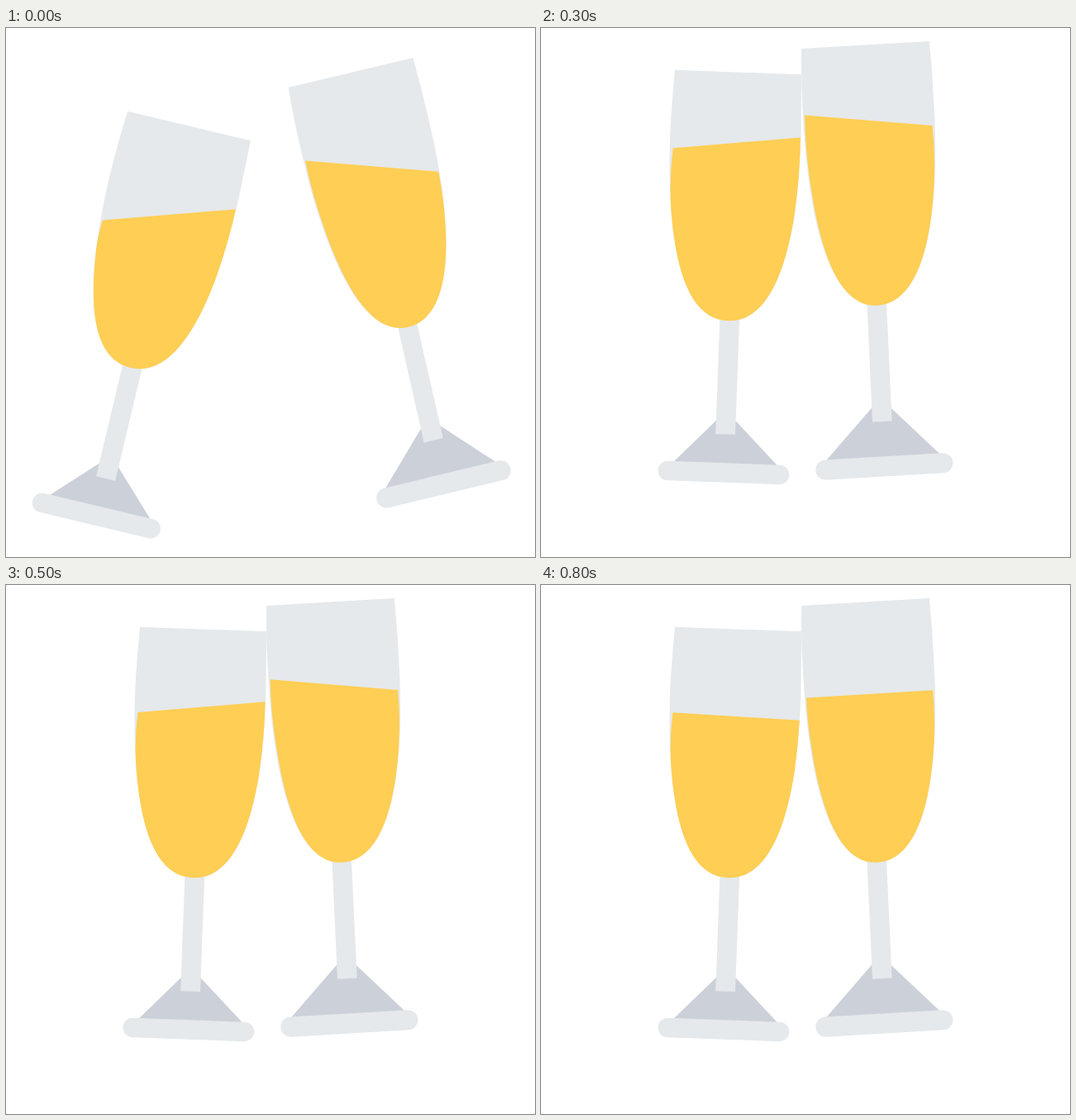
An HTML page for the animation above (1.4 s loop, 640 by 640 pixels).

```html
<!DOCTYPE html>
<html lang="en">
<head>
<meta charset="utf-8">
<title>Cheers</title>
<style>
  html, body { margin: 0; width: 100%; height: 100%; overflow: hidden; background: #fff; }
  svg { display: block; width: 100%; height: 100%; }
  .glass { fill: #e5e9ec; }
  .foot { fill: #ccd1d9; }
  .wine { fill: #ffce54; }
</style>
</head>
<body>
<svg viewBox="0 0 640 640">
  <!-- each glass is drawn upright, with the middle of its rim at 0,0 -->
  <g id="left">
    <path class="foot" d="M-62 475L-11 422H13L66 475Z"/>
    <path class="glass" d="M-11.2 290H12.6V438.4H-11.2Z"/>
    <rect class="glass" x="-79.3" y="473" width="159" height="23.5" rx="11.75"/>
    <path class="glass" d="M-76.5 0H76.5Q78 40 78.7 75C79 216 54 301 -1 301C-55 301 -79.5 218 -79.5 75Q-79 40 -76.5 0Z"/>
    <path class="wine"/>
  </g>
  <g id="right">
    <path class="foot" d="M-77.7 500L-18.2 439L6 441L61.7 500Z"/>
    <path class="glass" d="M-16.2 300H7.3L5.5 456H-18.2Z"/>
    <rect class="glass" x="-90.2" y="498.3" width="166.4" height="24.2" rx="12.1"/>
    <path class="glass" d="M-77.5 0H77.5Q79 40 78.5 80C78 222 51 315.5 -4 315.5C-57 315.5 -82 224 -80.3 75Q-80.5 40 -77.5 0Z"/>
    <path class="wine"/>
  </g>
</svg>
<script>
const LOOP = 1400, STEP = 100;
const CLINK = 2;            // step at which the wine swings back
const TILT = 4.7, SWING = 16;
const HALF = 76.8;          // half the width of the wine surface
const RAD = Math.PI / 180;

// poses: rim middle x, y and tilt in degrees; the last one is held.
// side: mirrors the wine; low: how much deeper its surface lies.
// l, r, belly: where the surface sides join the bowl, and the curve below.
const glasses = [
  {
    id: 'left', side: -1, low: 0,
    poses: [[221.5, 118.5, 13.4], [229, 96, 9.9], [239.3, 64.2, 4.8], [238.5, 53.5, 2.1]],
    l: [-74.8, 170.6], r: [74.4, 170.6],
    belly: 'C64.5 253 39.5 301 -1 301C-42 301 -65.3 254.3 -74.8 170.6'
  },
  {
    id: 'right', side: 1, low: 6,
    poses: [[417, 54, -13.5], [410.5, 41, -9.65], [400, 25.3, -4.25], [392.5, 20.5, -3.35]],
    l: [-75.2, 175.4], r: [72.7, 176.7],
    belly: 'C62.5 262.9 37.3 315.5 -4 315.5C-43.8 315.5 -66.6 264 -75.2 175.4'
  }
];

for (const g of glasses) {
  g.node = document.getElementById(g.id);
  g.wine = g.node.querySelector('.wine');
}

// Surface angle: builds up until the clink, then rocks with damping
function slosh(step) {
  const t = step - CLINK;
  const swing = t < 0
    ? Math.sin(Math.PI / 2 * step / CLINK)
    : Math.cos(Math.PI / 2 * t) * 0.895 ** t;
  return TILT + SWING * swing;
}

// Surface depth below the rim: rises to the clink, then settles
function depth(step) {
  return step < CLINK ? 110 - 15.5 * step : 79 + 26.5 * ((step - CLINK) / 6) ** 0.8;
}

// Control point that meets the bowl along its tangent
function bend(end, join) {
  const dy = (join[1] - end[1]) / 2;
  return [join[0] + Math.sign(join[0]) * 0.11 * dy, join[1] - dy];
}

function winePath({ side, low, l, r, belly }, angle, step) {
  const slope = Math.tan((side * slosh(step) - angle) * RAD);
  const mid = -1.5 * side, y = depth(step) + low;
  const a = [mid - HALF, y - HALF * slope];
  const b = [mid + HALF, y + HALF * slope];
  return `M${a}L${b}Q${bend(b, r)} ${r}${belly}Q${bend(a, l)} ${a}Z`;
}

function draw(ms) {
  const step = Math.min(Math.floor(ms % LOOP / STEP), 8);
  for (const g of glasses) {
    const [x, y, angle] = g.poses[Math.min(step, g.poses.length - 1)];
    g.node.setAttribute('transform', `translate(${x} ${y}) rotate(${angle})`);
    g.wine.setAttribute('d', winePath(g, angle, step));
  }
}

let start;
function tick(now) {
  start ??= now;
  draw(now - start);
  requestAnimationFrame(tick);
}
draw(0);
requestAnimationFrame(tick);
</script>
</body>
</html>
```
